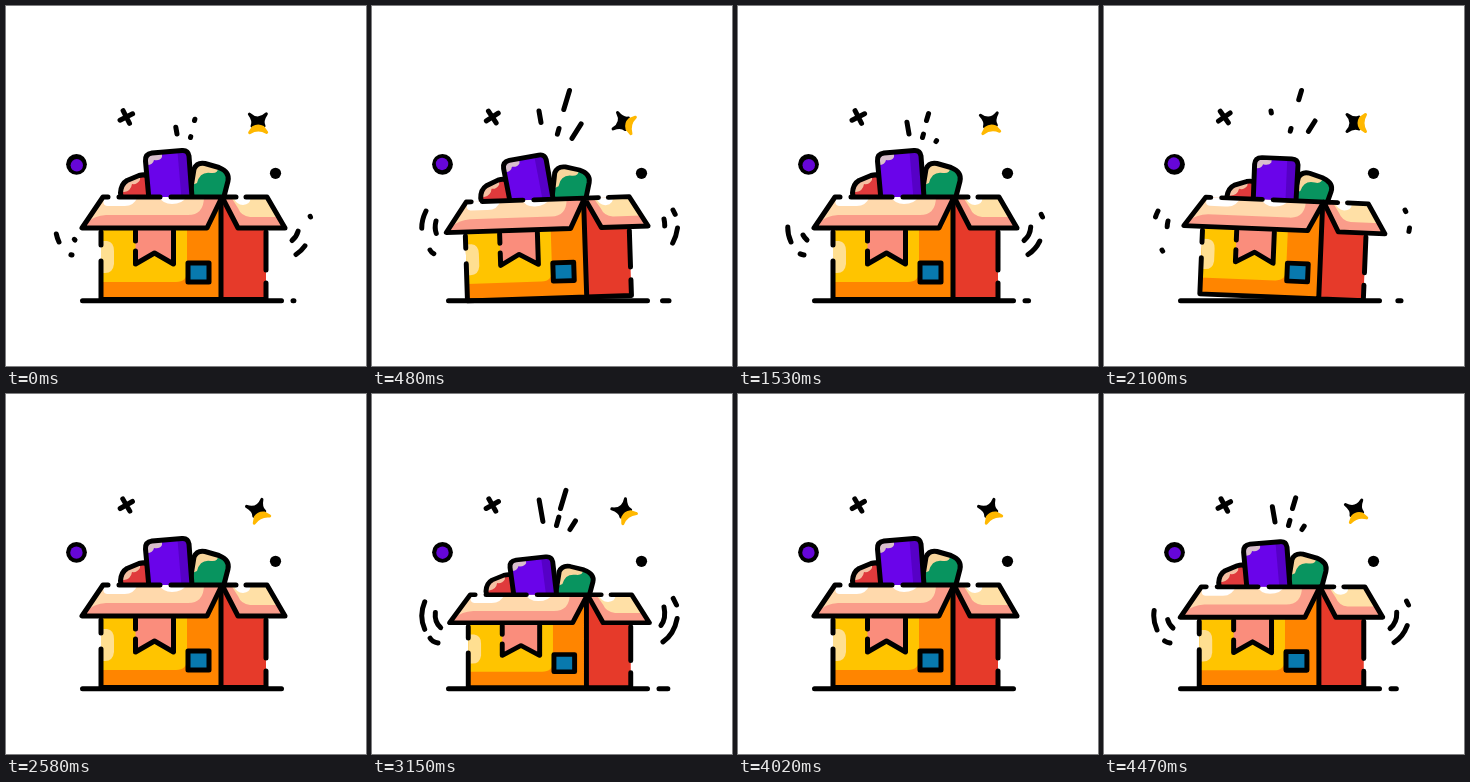
Animation, 360 px wide and 360 px high, one loop 4.5 s. Source, as an HTML page:

```html
<!DOCTYPE html>
<html lang="en">
<head>
<meta charset="utf-8">
<title>Open box</title>
<style>
html, body { margin: 0; width: 100%; height: 100%; overflow: hidden; background: #fff; }
svg { display: block; width: 100vw; height: 100vh; }
.ink { fill: none; stroke: #000; stroke-width: 5; stroke-linecap: round; stroke-linejoin: round; }
</style>
</head>
<body>
<svg viewBox="0 0 360 360">
  <defs>
    <path id="redShape" d="M117 202 L114.5 187 Q115 178 121 174.5 L133 169.5 Q142 167 145 174 L150 200"/>
    <path id="greenShape" d="M182 200 L188 163 Q191 156 199 157.5 L213 161.5 Q224 166 222 175 L215 202"/>
    <path id="purpleShape" d="M144 205 L139.5 155 Q139 148 146 147 L176 144.5 Q182 144 183 150 L187 205"/>
    <clipPath id="cRed"><use href="#redShape"/></clipPath>
    <clipPath id="cGreen"><use href="#greenShape"/></clipPath>
    <clipPath id="cPurple"><use href="#purpleShape"/></clipPath>
    <clipPath id="cFlap"><path d="M97 191 H216 L201 222 H76 Z"/></clipPath>
    <clipPath id="cSide"><path d="M216 191 H261 L279 222 H232 Z"/></clipPath>
  </defs>

  <g id="box">
    <g id="red">
      <g clip-path="url(#cRed)">
        <path d="M110 160 H155 V205 H110 Z" fill="#e03a3c"/>
        <path d="M110 165 H134 V174 Q131 179 126 178 Q125 185 118 186 H110 Z" fill="#f5c0a2"/>
      </g>
      <use href="#redShape" class="ink"/>
    </g>
    <g id="green">
      <g clip-path="url(#cGreen)">
        <path d="M180 150 H228 V205 H180 Z" fill="#08945f"/>
        <path d="M184 154 H200 L212 160 Q213 168 205 167 Q194 165 191 177 L184 180 Z" fill="#f8d59c"/>
      </g>
      <use href="#greenShape" class="ink"/>
    </g>
    <g id="purple">
      <g clip-path="url(#cPurple)">
        <path d="M130 140 H195 V210 H130 Z" fill="#6a04ea"/>
        <path d="M171 140 H195 V210 H177 Z" fill="#5600c6"/>
        <path d="M134 140 H156 V151 Q154 155 148 154 Q147 159 141 159 H134 Z" fill="#d9bfcc"/>
      </g>
      <use href="#purpleShape" class="ink"/>
    </g>

    <path d="M95 222 H200 L216 191 V294 H95 Z" fill="#ff8500"/>
    <path d="M95 222 H181 V265 Q181 276 170 276 H95 Z" fill="#ffc400"/>
    <path d="M95 235 H101 Q108 236 108 245 V258 Q107 267 99 267 H95 Z" fill="#ffdf91"/>
    <path d="M216 191 L232 222 H260 V294 H215 Z" fill="#e63a2a"/>
    <path d="M129.5 222 V258 L148.5 247 L167.5 258 V222 Z" fill="#fa8d7c"/>
    <path d="M182 257 H203 V276 H182 Z" fill="#0879ae"/>

    <g clip-path="url(#cFlap)">
      <path d="M70 190 H220 V224 H70 Z" fill="#fa9c8a"/>
      <path d="M88 188 H198 Q199 209 182 209 H100 Q88 210 82 216 Z" fill="#ffd9ac"/>
      <path d="M99 190 H132 Q128 201 117 200 H101 Q95 199 99 190 Z M153 190 H181 Q177 198 166 198 Q156 198 153 190 Z" fill="#fff"/>
    </g>
    <g clip-path="url(#cSide)">
      <path d="M214 190 H282 V224 H214 Z" fill="#fa9c8a"/>
      <path d="M223 188 H263 L273 211 H244 Q235 210 232 202 Z" fill="#ffe0a6"/>
      <path d="M227 190 H244 Q246 198 237 199 Q230 199 227 190 Z" fill="#fff"/>
    </g>

    <path class="ink" d="M102 191 H97 L76 222 H201 L216 191 L232 222 H279 L261 191 H240 M113 191 H154 M165 191 H230"/>
    <path class="ink" d="M95 226 V239 M95 255 V293.5 H260 V277 M260 226 V264 M215 193 V293"/>
    <path class="ink" d="M129.5 225 V235 M129.5 245 V258 L148.5 247 L167.5 258 V225"/>
    <path class="ink" d="M182 257 H203 V276 H182 Z"/>
  </g>

  <path class="ink" d="M76.5 294.8 H275.5"/>
  <g id="dashes"></g>

  <circle cx="70.5" cy="158.3" r="10.4"/>
  <circle id="core" r="6.2" fill="#6606d8"/>
  <circle cx="269.5" cy="167.3" r="5.6"/>
  <path id="cross" class="ink" d="M-5 -5 L5 5 M5 -5 L-5 5"/>
  <g id="star" stroke-width="3" stroke-linejoin="round">
    <path d="M-8.5 -9 Q0 -1 8.5 -9 Q3.5 -2 6 3 Q0 -1 -6 3 Q-3.5 -2 -8.5 -9 Z" stroke="#000"/>
    <path d="M-5 4.5 Q0 1.5 5 4.5 L8.5 9.5 Q0 4.5 -8.5 9.5 Z" fill="#ffb800" stroke="#ffb800"/>
  </g>
</svg>
<script>
const LOOP = 4500, CYCLE = 1440;
const $ = id => document.getElementById(id);

// path, head start, head end, tail start, tail end
const lines = [
  ['M171 128 L167 105', -120, 290, 260, 700],
  ['M188.5 114.5 L197.5 84.5', -20, 460, 280, 830],
  ['M184.5 131.5 L187 122.5', -30, 290, 290, 810],
  ['M198 135.5 L211 115', 70, 550, 400, 925],
  ['M53 236 Q46 221 54 205', -110, 310, 260, 760],
  ['M69 234 Q61 227 64 215', -15, 330, 260, 820],
  ['M66 249 Q60 248 58 244', -30, 280, 300, 720],
  ['M286 234.5 Q295 227 292 213', -250, 270, 200, 600],
  ['M290 248.5 Q303 240 305.5 222', -200, 310, 255, 710],
  ['M304.5 211 L301 204', -30, 290, 310, 765],
  ['M287 294.8 H297', -30, 310, 290, 830]
].map(([d, ...times]) => {
  const el = document.createElementNS('http://www.w3.org/2000/svg', 'path');
  el.setAttribute('d', d);
  el.setAttribute('class', 'ink');
  $('dashes').append(el);
  return { el, times, len: el.getTotalLength() };
});

// time, height, lean, inner lean, inner drop
const poses = [
  [0, 1, 0, 0, 0],
  [90, 1, 0, 0, 0],
  [150, .982, 0, 0, .5],
  [270, .905, 0, -2, 5],
  [325, .895, -.3, -3, 5],
  [460, .965, -2, -4, 1],
  [650, .946, 2.4, 5, 1],
  [780, .99, .6, 3.5, 0],
  [890, 1, 0, 0, 0],
  [CYCLE, 1, 0, 0, 0]
];

const clamp = x => Math.max(0, Math.min(1, x));
const ease = x => (1 - Math.cos(Math.PI * x)) / 2;
const move = (id, value) => $(id).setAttribute('transform', value);

function poseAt(p) {
  const i = Math.max(1, poses.findIndex(k => k[0] >= p));
  const a = poses[i - 1], b = poses[i];
  const k = ease((p - a[0]) / (b[0] - a[0]));
  return a.map((v, j) => v + (b[j] - v) * k).slice(1);
}

function drawLine({ el, times: [h0, h1, t0, t1], len }, p) {
  const head = clamp((p - h0) / (h1 - h0)) * len;
  const tail = clamp((p - t0) / (t1 - t0)) * len;
  const shown = p > h0 && p < t1;
  el.style.display = shown ? '' : 'none';
  if (shown) {
    el.setAttribute('stroke-dasharray', `${Math.max(.05, head - tail)} ${len * 2}`);
    el.setAttribute('stroke-dashoffset', -Math.min(tail, len - .1));
  }
}

function draw(t) {
  const p = t % CYCLE;
  const [sy, lean, inner, drop] = poseAt(p);
  const sx = 1 - (1 - sy) * .16;
  // the box tips over the corner it leans towards
  move('box', `rotate(${lean} ${178 + lean * 22} 294) translate(178 294) scale(${sx} ${sy}) translate(-178 -294)`);
  move('purple', `translate(0 ${drop}) rotate(${inner} 163 215)`);
  move('green', `translate(0 ${drop * .4 + Math.max(0, inner) * .7}) rotate(${inner * .4} 203 205)`);
  move('red', `translate(${inner * .6} ${Math.max(0, inner) * .6}) rotate(${inner * .5} 130 205)`);

  const turn = 2 * Math.PI * p / CYCLE;
  const wave = Math.cos(turn);
  move('star', `translate(252 117) rotate(${45 * (Math.cos(turn + .2) - 1)})`);
  move('cross', `translate(120.3 111) rotate(${14 + 4 * wave})`);
  $('core').setAttribute('cx', 70.3 + .5 * wave);
  $('core').setAttribute('cy', 158.4 + .9 * wave);

  const q = p > 1100 ? p - CYCLE : p;
  lines.forEach(l => drawLine(l, q));
}

const start = performance.now();
function frame() {
  draw((performance.now() - start) % LOOP);
  requestAnimationFrame(frame);
}
frame();
</script>
</body>
</html>
```
